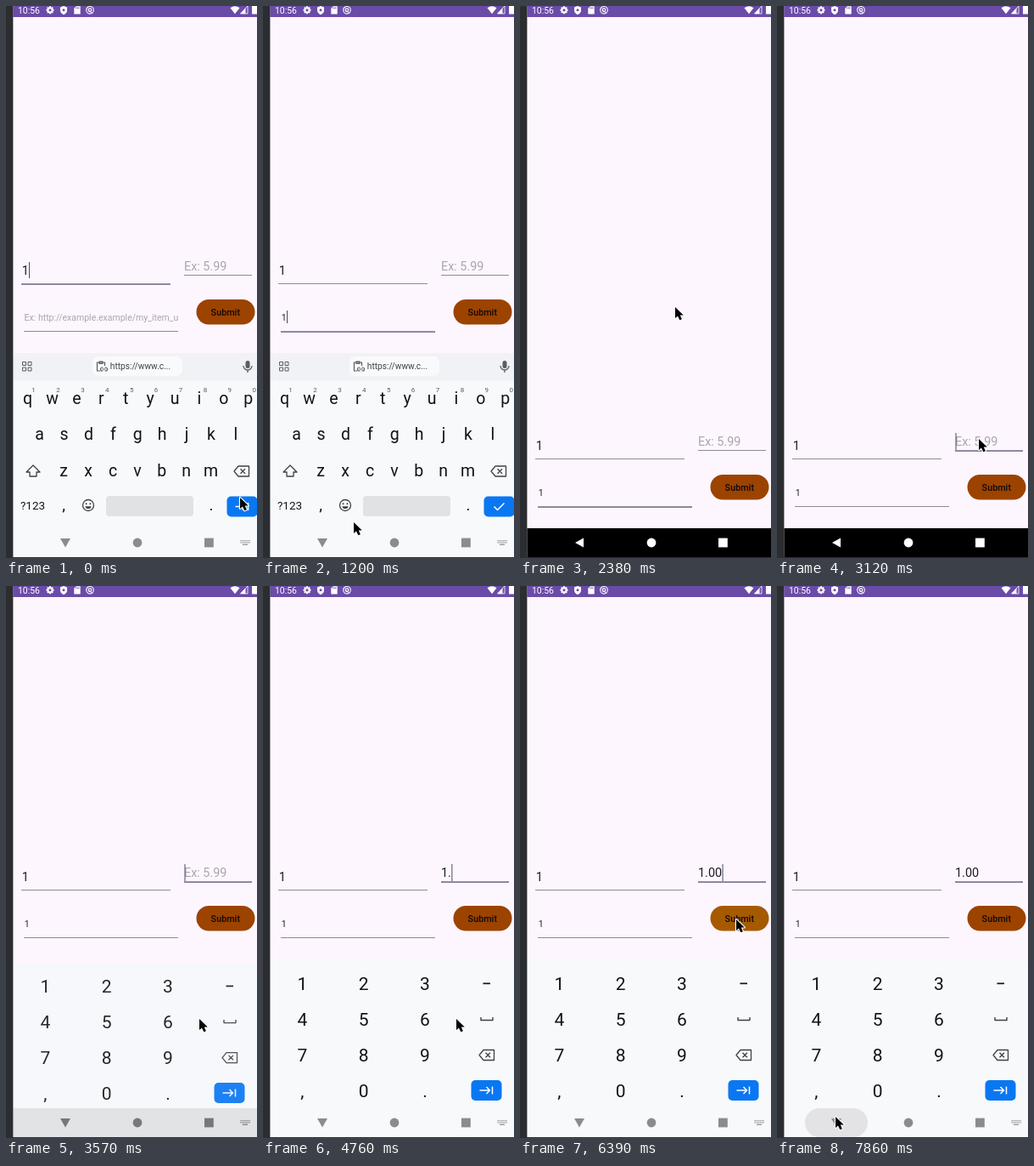
These frames come from a looping animation (296 by 649 pixels, 8000 ms). An HTML page with a canvas:

```html
<!DOCTYPE html>
<html lang="en">
<head>
<meta charset="utf-8">
<title>Form entry</title>
<style>
html, body { margin: 0; width: 100%; height: 100%; overflow: hidden; background: #fdf6ff; }
canvas { display: block; width: 296px; height: 649px; }
</style>
</head>
<body>
<canvas id="stage"></canvas>
<script>
const W = 296, H = 649, LOOP = 8000, STEP = 148.3, BLINK = 500;
const canvas = document.getElementById('stage');
const ctx = canvas.getContext('2d');
const dpr = window.devicePixelRatio || 1;
canvas.width = W * dpr;
canvas.height = H * dpr;

const PAGE = '#fdf6ff', PANEL = '#f7f9fb', INK = '#1c1b1f', KEY = '#121315';
const ICON = '#3f4145', SOFT = '#5a5c60', GREY = '#8b8c8f', HINT = '#aaa5ae', BLUE = '#0a77f2';

// Moments of the session, in ms
const NEXT = 140, TYPE_URL = 880, HIDE = 2060, TAP_PRICE = 3100, SHOW = 3190;
const PRICE = '1.00', PRICE_KEYS = [3600, 4440, 4860, 5070];
const EDITS = [0, NEXT, TYPE_URL, TAP_PRICE, ...PRICE_KEYS];

// Pointer moves: start, end, x, y and height of the arc
const MOVES = [
  [0, 1, 275, 577, 0],
  [140, 560, 267, 588, 0],
  [850, 1640, 68, 624, 18],
  [2060, 3070, 238, 508, 219],
  [3100, 3500, 227, 508, 0],
  [4760, 5130, 272, 614, 0],
  [5130, 5780, 254, 391, 0],
  [6390, 7100, 64, 610, 0],
  [7100, 7420, 147, 616, 0],
  [7430, 7640, 68, 623, 0]
];

const clamp = k => Math.min(1, Math.max(0, k));
const easeOut = k => 1 - (1 - k) ** 3;

function pointerAt(t) {
  let [, , x, y] = MOVES[0];
  for (const [start, end, toX, toY, arc] of MOVES) {
    const e = easeOut(clamp((t - start) / (end - start)));
    x += (toX - x) * e;
    y += (toY - y) * e - arc * 4 * e * (1 - e);
  }
  return [Math.round(x), Math.round(y)];
}

// Distance below its resting place, and opacity
function panelAt(t) {
  if (t < SHOW) {
    const k = clamp((t - HIDE) / 300);
    return [210 * k * k, 1 - k];
  }
  const left = 1 - clamp((t - SHOW) / 460);
  return [400 * left ** 3, 1 - left ** 1.5];
}

function caretOn(t) {
  if (t >= HIDE && t < TAP_PRICE) return false;
  const last = Math.max(...EDITS.filter(e => e <= t));
  return Math.floor((t - last) / BLINK) % 2 === 0;
}

function text(s, x, y, size, color = INK, align = 'left', weight = 400) {
  ctx.font = `${weight} ${size}px Roboto, sans-serif`;
  ctx.fillStyle = color;
  ctx.textAlign = align;
  ctx.fillText(s, x, y);
}
function keyRow(keys, x, y, gap, size, color = KEY) {
  [...keys].forEach((k, i) => text(k, x + i * gap, y, size, color, 'center'));
}
function rect(x, y, w, h, color) {
  ctx.fillStyle = color;
  ctx.fillRect(x, y, w, h);
}
function pill(x, y, w, h, r, color) {
  ctx.fillStyle = color;
  ctx.beginPath();
  ctx.roundRect(x, y, w, h, r);
  ctx.fill();
}
function disc(x, y, r, color) {
  ctx.fillStyle = color;
  ctx.beginPath();
  ctx.arc(x, y, r, 0, 7);
  ctx.fill();
}
function ring(x, y, r, color, width = 1.2) {
  ctx.strokeStyle = color;
  ctx.lineWidth = width;
  ctx.beginPath();
  ctx.arc(x, y, r, 0, 7);
  ctx.stroke();
}
function fill(d, x, y, color) {
  ctx.save();
  ctx.translate(x, y);
  ctx.fillStyle = color;
  ctx.fill(new Path2D(d));
  ctx.restore();
}
function line(d, x, y, color, width = 1.3) {
  ctx.save();
  ctx.translate(x, y);
  ctx.strokeStyle = color;
  ctx.lineWidth = width;
  ctx.lineJoin = 'round';
  ctx.stroke(new Path2D(d));
  ctx.restore();
}

function statusBar() {
  const bar = '#6b4ba8', white = '#fff';
  rect(8, 0, W - 8, 13, bar);
  text('10:56', 14, 8.6, 10.4, white);
  for (let a = 0; a < 6; a += Math.PI / 4) disc(52 + 3.6 * Math.cos(a), 4.8 + 3.6 * Math.sin(a), 1.1, white);
  ring(52, 4.8, 2.6, white, 2);
  fill('M0-5L4-3.5V0Q4 3.5 0 5.2Q-4 3.5-4 0V-3.5Z', 68, 5, white);
  disc(68, 4.8, 1.5, bar);
  fill('M-1.2-4.6H3.7V4.8H-3.7V-2Z', 84, 4.8, white);
  for (let i = 0; i < 3; i++) rect(82.3 + i * 1.6, 1.4, .8, 2, bar);
  ring(99, 4.8, 4.3, white, 1.1);
  ring(99, 4.8, 1.9, white, 1.1);
  line('M-1 0L3 4', 99, 4.8, white, 1);
  fill('M0 5L-5.5-2Q0-6 5.5-2Z', 270, 4.2, white);
  line('M4-4.5V4.5H-4.5Z', 281, 4.5, white, .8);
  fill('M1.5-2V4.5H-4.5Z', 281, 4.5, white);
  rect(290, 0, 6, 9.5, white);
}

function underline(x0, x1, y, focused) {
  if (focused) rect(x0, y + .4, x1 - x0, 1.3, '#564d70');
  else rect(x0, y, x1 - x0, 1, '#8e8a93');
}
function caret(x, y, h) { rect(x, y, 1, h, '#4f4668'); }

function form(t) {
  const field = t < NEXT ? 1 : t < TAP_PRICE ? 2 : 3;
  const price = PRICE.slice(0, PRICE_KEYS.filter(k => k <= t).length);
  const blink = caretOn(t), hasUrl = t >= TYPE_URL;
  const pressed = t >= 5920 && t < 6520;
  ctx.save();
  ctx.translate(0, t < HIDE ? 0 : t < SHOW ? 206 : 31);

  text('1', 18.8, 316, 14.4);
  underline(18, 194, 326, field === 1);
  if (field === 1) caret(27, 301, 19);

  ctx.save();
  ctx.beginPath();
  ctx.rect(20, 354, 183, 24);
  ctx.clip();
  if (hasUrl) text('1', 21.8, 370, 10.5);
  else text('Ex: http://example.example/my_item_u', 21.6, 369.7, 10.5, HINT);
  ctx.restore();
  underline(21, 203, 382, field === 2);
  if (field === 2 && blink) caret(hasUrl ? 28 : 21.5, 358, 15);

  text(price || 'Ex: 5.99', 210, 311, 14.4, price ? INK : HINT);
  underline(210, 290, 316, field === 3);
  if (field === 3 && blink) caret(210.5 + (price && ctx.measureText(price).width), 296, 20);

  pill(224.5, 345, 69, 29.5, 14.7, pressed ? '#a65a00' : '#9c4300');
  text('Submit', 258.8, 363.6, 10.8, '#120a06', 'center', 500);
  ctx.restore();
}

function backspace(x, y) {
  line('M-9 0L-4-6H8.5V6H-4ZM-1.5-2.7L4 2.7M4-2.7L-1.5 2.7', x, y, ICON);
}
function actionKey(x, y, icon) {
  pill(x - 18, y - 12, 36, 24, 5, BLUE);
  line(icon, x, y, '#fff', 1.5);
}
const ARROW = 'M-8 0H4M0-4L4 0L0 4M7-4.5V4.5', CHECK = 'M-6 0L-2 4L6-4';

function letters(t) {
  const gap = 28.9;
  rect(8, 408, W - 8, 241, PANEL);
  rect(8, 408, W - 8, 32, '#f0f2f5');
  for (let i = 0; i < 4; i++) line('M0 0H4V4H0Z', 19.5 + i % 2 * 6.5, 418.5 + (i >> 1) * 6.5, SOFT, 1);
  pill(102, 412, 106, 23, 7, '#f9fafc');
  line('M-1 5H-4.5V-5H4.5V-1M-2-6H2V-3.5H-2Z', 112, 424, SOFT, 1.2);
  line('M0-2H-1A2 2 0 0 0-1 2H0M2-2H3A2 2 0 0 1 3 2H2M-1 0H3', 114.5, 427, SOFT, 1.1);
  text('https://www.c...', 122.8, 427.2, 10.2, ICON);
  pill(282.5, 417, 5, 9, 2.5, SOFT);
  line('M-5-1A5 5 0 0 0 5-1M0 4V7', 285, 424, SOFT);

  keyRow('qwertyuiop', 25.6, 468, gap, 19.5);
  keyRow('1234567890', 32.6, 454.2, gap, 8, SOFT);
  keyRow('asdfghjkl', 39.6, 510, gap, 19.5);
  keyRow('zxcvbnm', 68.2, 553, gap, 19.5);
  line('M0-7L8 1H4V6H-4V1H-8Z', 32, 547, ICON);
  backspace(278, 547);
  text('?123', 31.5, 592, 13.5, KEY, 'center');
  keyRow(',.', 68, 593, 174, 19);
  ring(97, 587, 6.5, ICON, 1.3);
  for (const side of [-2.4, 2.4]) disc(97 + side, 585.3, 1, ICON);
  fill('M-3.6 1.2A3.7 3.7 0 0 0 3.6 1.2Z', 97, 587, ICON);
  pill(118, 576, 103, 24, 4, '#e1e2e3');
  actionKey(278.5, 588.5, t < NEXT ? ARROW : CHECK);
}

function numbers() {
  rect(8, 440, W - 8, 209, PANEL);
  ['123', '456', '789', ',0.'].forEach((keys, r) => keyRow(keys, 46.4, 474.7 + r * 42.1, 72.3, 21));
  rect(259.5, 466.5, 8.5, 1.7, KEY);
  line('M-7-2V1.5H7V-2', 264, 509, ICON, 1.4);
  backspace(264, 551.5);
  actionKey(263.5, 593, ARROW);
}

function navBar(alpha, pressed) {
  rect(8, 614, W - 8, 35, '#000');
  ctx.globalAlpha = alpha;
  rect(8, 614, W - 8, 35, PANEL);
  ctx.globalAlpha = 1;
  const color = alpha === 0 ? '#fff' : alpha < 1 ? '#77787b' : GREY;
  if (pressed) pill(33, 614, 74, 34, 17, '#e3e3e5');
  fill(alpha ? 'M-6-5H6L0 5.5Z' : 'M5-5.5V5.5L-5 0Z', 70, 631, color);
  disc(155, 631, 5.4, color);
  rect(234, 625.6, 10.8, 10.8, color);
  if (!alpha) return;
  for (let i = 0; i < 12; i++) rect(276.5 + i % 6 * 2, 628 + (i > 5) * 2.2, 1.2, 1.3, color);
  rect(279, 632.6, 6, 1.2, color);
}

function pointer(x, y) {
  const arrow = 'M0 0V13L3 10.4L5.3 15.3L7.9 14.2L5.8 9.5H9.8Z';
  line(arrow, x + 1, y + 1, '#fff', 2.2);
  fill(arrow, x + 1, y + 1, '#000');
}

function draw(t) {
  const [drop, alpha] = panelAt(t);
  ctx.setTransform(dpr, 0, 0, dpr, 0, 0);
  rect(0, 0, W, H, PAGE);
  form(t);
  if (alpha) {
    ctx.save();
    ctx.globalAlpha = alpha;
    ctx.translate(0, drop);
    t < SHOW ? letters(t) : numbers();
    ctx.restore();
  }
  navBar(alpha, (t > 1600 && t < HIDE) || t > 7600);
  statusBar();
  rect(0, 0, 8, H, '#2b2d30');
  rect(8, 0, .6, H, '#77757c');
  rect(0, 648, W, 1, '#2b2d30');
  pointer(...pointerAt(t));
}

function tick(now) {
  draw(Math.floor((now % LOOP) / STEP) * STEP);
  requestAnimationFrame(tick);
}
draw(0);
requestAnimationFrame(tick);
</script>
</body>
</html>
```
